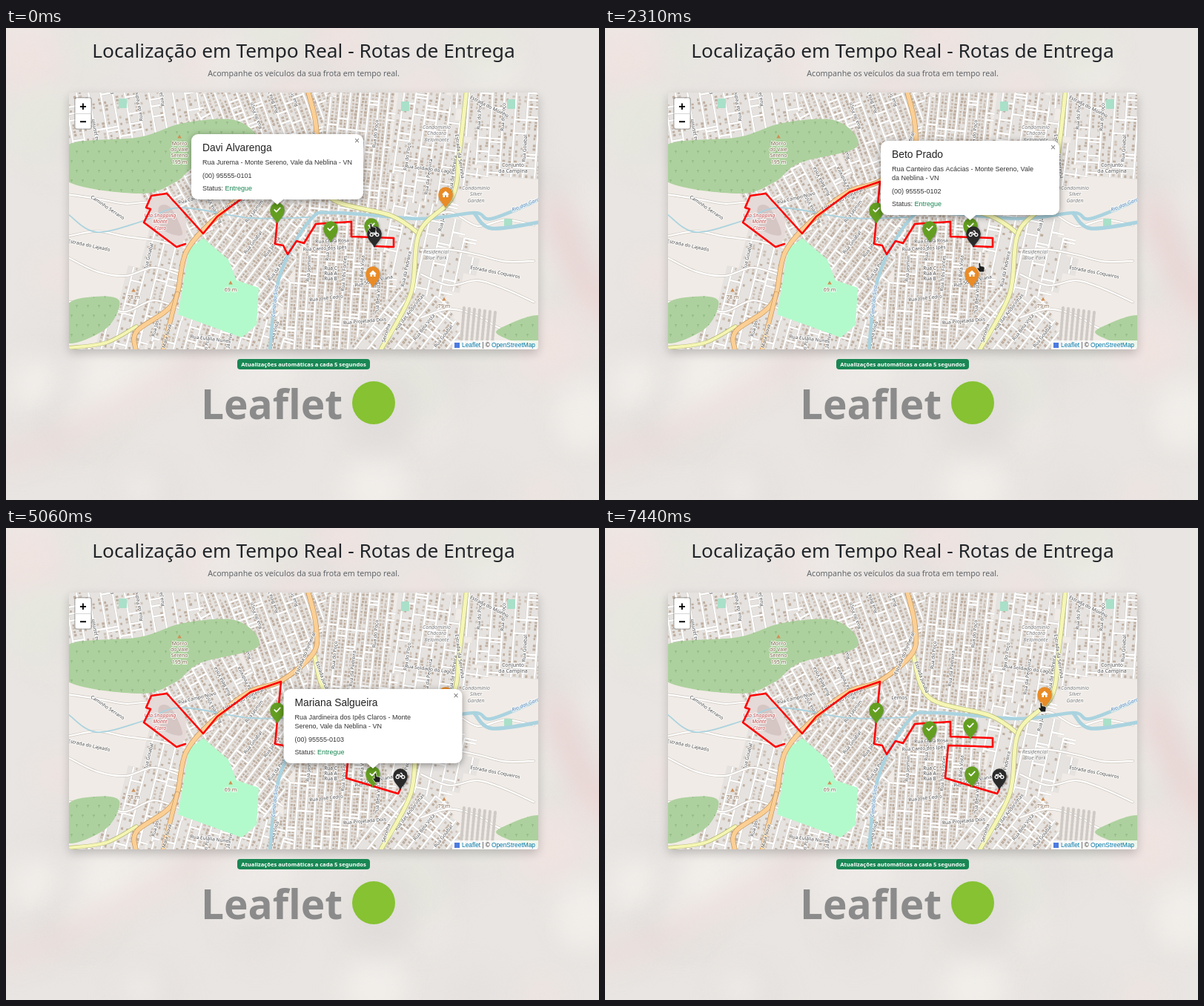
An HTML page with a canvas that plays this animation: 800x636 px, repeating every 7500 ms.

```html
<!DOCTYPE html>
<html lang="pt-BR">
<head>
<meta charset="utf-8">
<title>Rotas de Entrega</title>
<style>
  html, body { margin: 0; width: 100%; height: 100%; overflow: hidden; background: #e9e5e2; }
  canvas { display: block; }
</style>
</head>
<body>
<canvas id="stage" width="800" height="636"></canvas>
<script>
const LOOP = 7500;
const SANS = '"Noto Sans", sans-serif';
const ARIAL = '"Liberation Sans", Arial, sans-serif';
const MAP = { x: 85, y: 87, w: 633, h: 346 };
const stage = document.getElementById('stage').getContext('2d');
const scene = document.createElement('canvas');
scene.width = 800;
scene.height = 636;
const bg = scene.getContext('2d');

function random(seed) {
  return () => {
    seed = (seed * 1664525 + 1013904223) >>> 0;
    return seed / 4294967296;
  };
}

const clamp = (v, lo = 0, hi = 1) => Math.max(lo, Math.min(hi, v));

function text(c, str, x, y, font, color, align = 'left') {
  c.font = font;
  c.fillStyle = color;
  c.textAlign = align;
  c.fillText(str, x, y);
}

function box(c, x, y, w, h, r, color) {
  c.beginPath();
  c.roundRect(x, y, w, h, r);
  c.fillStyle = color;
  c.fill();
}

function disc(c, x, y, r, color) {
  c.beginPath();
  c.arc(x, y, r, 0, 7);
  c.fillStyle = color;
  c.fill();
}

function trace(c, p) {
  c.beginPath();
  for (let i = 0; i < p.length; i += 2) c.lineTo(p[i], p[i + 1]);
}

// Catmull-Rom spline through the points of a flat list.
function smooth(p, closed = false) {
  const n = p.length / 2;
  const at = i => {
    const k = closed ? (i + n) % n : clamp(i, 0, n - 1);
    return [p[2 * k], p[2 * k + 1]];
  };
  bg.beginPath();
  bg.moveTo(p[0], p[1]);
  for (let i = 0; i < (closed ? n : n - 1); i++) {
    const [a, b, c, d] = [at(i - 1), at(i), at(i + 1), at(i + 2)];
    bg.bezierCurveTo(b[0] + (c[0] - a[0]) / 6, b[1] + (c[1] - a[1]) / 6,
      c[0] - (d[0] - b[0]) / 6, c[1] - (d[1] - b[1]) / 6, c[0], c[1]);
  }
}

function road(p, width, color, casing) {
  smooth(p);
  bg.lineJoin = bg.lineCap = 'round';
  for (const [w, style] of [[width + 1.4, casing], [width, color]]) {
    if (!style) continue;
    bg.lineWidth = w;
    bg.strokeStyle = style;
    bg.stroke();
  }
}

function area(p, color) {
  smooth(p, true);
  bg.fillStyle = color;
  bg.fill();
}

function label(str, x, y, deg = 0, color = '#484848', font = '6.5px ') {
  bg.save();
  bg.translate(x, y);
  bg.rotate(deg * Math.PI / 180);
  bg.font = font + SANS;
  bg.textAlign = 'center';
  bg.lineJoin = 'round';
  bg.lineWidth = 2;
  bg.strokeStyle = 'rgba(255,255,255,.8)';
  bg.strokeText(str, 0, 2);
  bg.fillStyle = color;
  bg.fillText(str, 0, 2);
  bg.restore();
}

function place(str, x, y, color = '#787878', font = 'italic 7px ') {
  str.split('|').forEach((s, i) => label(s, x, y + i * 8.4, 0, color, font));
}

function peak(str, x, y) {
  trace(bg, [x - 2.8, y + 2.5, x, y - 2.5, x + 2.8, y + 2.5]);
  bg.fillStyle = '#d08f55';
  bg.fill();
  place(str, x, y + 9.5, '#7d6249', '7px ');
}

// Each spot of land belongs to the nearest centre; density 0 is open land.
const quarters = [
  { x: 145, y: 95, deg: -10, gap: 16, density: 0.35 },
  { x: 375, y: 140, deg: -20, gap: 14, density: 0.9 },
  { x: 470, y: 165, deg: 6, gap: 13, density: 0.95 },
  { x: 575, y: 165, deg: 8, gap: 16, density: 0.65 },
  { x: 670, y: 130, deg: 4, gap: 16, density: 0.6 },
  { x: 270, y: 225, deg: -28, gap: 14, density: 0.8 },
  { x: 325, y: 300, deg: 37, gap: 12, density: 0.9 },
  { x: 455, y: 345, deg: 4, gap: 12, density: 0.95 },
  { x: 215, y: 350, deg: 14, gap: 16, density: 0.5 },
  { x: 270, y: 430, deg: 15, gap: 14, density: 0.6 },
  { x: 580, y: 300, deg: 12, gap: 17, density: 0.25 },
  { x: 555, y: 415, deg: 38, gap: 14, density: 0.65 },
  { x: 660, y: 370, density: 0 },
  { x: 660, y: 265, density: 0 },
  { x: 125, y: 300, density: 0 }
];
const words = ['Jatobá', 'da Pedreira', 'Bela Vista', 'das Andorinhas', 'Jasmim', 'do Poço', 'Três Fontes', 'Goiabal'];

function owner(x, y) {
  const dist = q => Math.hypot(q.x - x, q.y - y);
  return quarters.reduce((a, b) => dist(b) < dist(a) ? b : a);
}

function drawQuarter(q, seed) {
  const rnd = random(seed);
  const a = q.deg * Math.PI / 180, size = q.gap * 12, step = 4.6;
  const inside = (u, v) =>
    owner(q.x + u * Math.cos(a) - v * Math.sin(a), q.y + u * Math.sin(a) + v * Math.cos(a)) === q;
  const streets = new Path2D();
  bg.save();
  bg.translate(q.x, q.y);
  bg.rotate(a);
  for (let u = -size; u <= size; u += q.gap) {
    for (let v = -size; v < size; v += step) {
      if (!inside(u, v)) continue;
      bg.fillStyle = '#e5e2df';
      bg.fillRect(u - q.gap / 2, v, q.gap + 0.5, step + 0.5);
      streets.moveTo(u, v);
      streets.lineTo(u, v + step);
      if (rnd() < 0.13) {
        streets.moveTo(u, v);
        streets.lineTo(u + q.gap, v);
      }
      for (const side of [-1, 1]) {
        if (rnd() > q.density) continue;
        bg.fillStyle = rnd() < 0.5 ? '#bfae9f' : '#cfc2b7';
        bg.fillRect(u + side * 4 - 1.7 + rnd(), v + rnd(), 2.4 + rnd() * 1.6, 2.4 + rnd() * 1.4);
      }
    }
  }
  for (const [width, color] of [[3.2, '#cbc6c1'], [2.4, '#fff']]) {
    bg.lineWidth = width;
    bg.strokeStyle = color;
    bg.stroke(streets);
  }
  for (let u = -size; u <= size; u += q.gap * 2) {
    const v = (rnd() - 0.5) * 110;
    const name = 'Rua ' + words[Math.floor(rnd() * words.length)];
    if (inside(u, v - 20) && inside(u, v + 20)) label(name, u, v, -90);
  }
  bg.restore();
}

function lanes() {
  const rnd = random(11);
  for (let i = 0; i < 8; i++) {
    const left = i % 2 ? 560 : 85, y = 230 + i * 22;
    const p = [];
    for (let k = 0; k < 5; k++) p.push(left + k * 38, y + (rnd() - 0.5) * 22 + k * 5);
    road(p, 2.2, '#fff', '#cfc8c1');
  }
}

function forest(p) {
  area(p, '#add19e');
  bg.save();
  bg.clip();
  bg.fillStyle = '#98bf8a';
  for (let y = 126; y < 433; y += 13) {
    for (let x = 88 + (y % 2) * 7; x < 718; x += 15) {
      bg.fillRect(x, y, 1, 4);
      bg.fillRect(x - 1, y, 3, 2);
    }
  }
  bg.restore();
}

function backdrop() {
  const rnd = random(27);
  const tints = ['#f1eeea', '#e1dddb', '#ede9e6', '#e6e7de', '#efe3e0', '#e5e1df'];
  bg.fillStyle = '#e9e5e2';
  bg.fillRect(0, 0, 800, 636);
  bg.save();
  bg.filter = 'blur(18px)';
  for (let i = 0; i < 90; i++) {
    disc(bg, rnd() * 800, rnd() * 636, 18 + rnd() * 34, tints[i % tints.length]);
  }
  road([-20, 585, 90, 545, 290, 430], 20, '#ecdcd9');
  road([740, 240, 775, 330, 830, 390], 26, '#e8cfce');
  bg.restore();
}

function drawLabels() {
  label('Caminho Serrano', 137, 242, 34);
  label('Estrada do Lajeado', 112, 293, 12);
  label('Rua Campo Novo', 258, 229, -14);
  label('Estrada do Pinheiral', 320, 231, -26);
  label('Estrada do Pinheiral', 404, 169, -67);
  label('Estrada Jurubá', 427, 201, 70);
  label('Estrada da Serrinha', 612, 173, 82);
  label('Estrada do Moinho', 652, 106, 27);
  label('Rua Soldado do Lago', 570, 190, 7);
  label('Estrada dos Coqueiros', 660, 329, 11);
  label('Rua Clara Rosa', 440, 287, -2);
  label('Rua Canto dos Ipês', 430, 297, -3);
  label('Rua José Cedro', 432, 364, -6);
  label('Rua Soares Viana', 496, 341, -13);
  label('Rua Projetada Dois', 484, 395, -5);
  label('Rua Eulália Nunes', 276, 419, 7);
  ['Rua C', 'Rua A', 'Rua B'].forEach((s, i) => label(s, 438, 324 + i * 7));
  label('Rio das Garças', 704, 237, -22, '#4d80b3', 'italic 7px ');
  label('Canal do Sítio', 363, 368, -84, '#4d80b3', 'italic 7px ');
  label('Mata Nova', 217, 415, -75);
  label('Serrinha', 513, 411, -72);
  place('Condomínio|Chácara|Belomonte', 581, 134);
  place('Condomínio|Silver|Garden', 634, 216);
  place('Residencial|Blue Park', 580, 302);
  place('Conjunto|da Campina', 684, 185, '#555', '7px ');
  place('Lemos', 397, 229, '#555', '7px ');
  place('Vila Shopping|Monte|Claro', 208, 253, '#c44a4a');
  peak('Morro|do Vale|Sereno|195 m', 234, 146);
  peak('69 m', 303, 343);
  peak('78 m', 172, 353);
  peak('79 m', 591, 365);
}

function drawLand() {
  quarters.forEach((q, i) => q.density && drawQuarter(q, i + 3));
  lanes();
  forest([82, 158, 180, 147, 240, 128, 312, 125, 340, 160, 262, 182, 228, 208, 180, 223, 82, 206]);
  forest([82, 374, 120, 362, 153, 368, 135, 405, 82, 424]);
  forest([721, 388, 672, 402, 665, 414, 721, 430]);
  trace(bg, [247, 298, 266, 283, 300, 312, 311, 340, 341, 350, 338, 400, 318, 417, 232, 386, 240, 340]);
  bg.fillStyle = '#b2facb';
  bg.fill();
  for (const [x, y] of [[152, 95], [676, 96], [533, 99], [672, 257]]) box(bg, x, y, 11, 13, 1, '#a9e0c9');

  area([196, 230, 217, 227, 243, 262, 232, 293, 190, 264], '#e6dad8');
  area([206, 242, 222, 242, 238, 278, 211, 271], '#d5c6c4');

  // Terraced plots
  bg.strokeStyle = '#cfcac5';
  bg.lineWidth = 4;
  bg.setLineDash([3, 2]);
  for (let i = 0; i < 7; i++) {
    trace(bg, [618 + i * 7, 377 + i, 614 + i * 7, 424]);
    bg.stroke();
  }
  bg.setLineDash([]);
}

function drawRoads() {
  const water = '#aad3df', yellow = '#f5f6b4', olive = '#b8bc78';
  const orange = '#fbcf94', edge = '#c8955a';
  road([718, 232, 655, 257, 632, 249, 560, 257, 445, 249, 410, 259, 369, 335, 356, 433], 4.5, water);
  road([632, 250, 655, 270, 718, 262], 5, water);
  road([85, 252, 122, 275, 185, 260, 235, 242, 330, 256, 408, 255], 1.8, water);
  road([85, 431, 135, 424, 176, 402], 4, yellow, olive);
  road([416, 172, 438, 229, 520, 253, 558, 278], 5, yellow, olive);
  road([621, 87, 612, 165, 602, 228, 558, 275, 546, 358, 506, 433], 5, yellow, olive);
  road([175, 433, 177, 408, 226, 370, 243, 302, 285, 254, 330, 220, 371, 206, 415, 168, 418, 130, 408, 87], 5.5, orange, edge);
  road([212, 433, 231, 358], 5, orange, edge);
}

function drawControls() {
  box(bg, 92, 93, 24, 44, 4, 'rgba(0,0,0,.22)');
  box(bg, 93.5, 94.5, 21, 41, 2.5, '#fff');
  bg.fillStyle = '#ccc';
  bg.fillRect(93.5, 115, 21, 0.8);
  text(bg, '+', 104, 110.5, 'bold 16px ' + ARIAL, '#000', 'center');
  bg.fillRect(100, 125.3, 8, 1.9);

  const small = '8.4px ' + ARIAL;
  box(bg, 602, 421, 116, 12, 0, 'rgba(255,255,255,.8)');
  text(bg, 'OpenStreetMap', 714, 430, small, '#0078a8', 'right');
  text(bg, '| ©', 653, 430, small, '#333', 'right');
  text(bg, 'Leaflet', 615, 430, small, '#0078a8');
  box(bg, 605, 424, 7, 7, 0, '#4c7be1');
}

function drawScene() {
  const { x, y, w, h } = MAP;
  backdrop();
  text(bg, 'Localização em Tempo Real - Rotas de Entrega', 401.5, 40, '26.3px ' + SANS, '#212529', 'center');
  text(bg, 'Acompanhe os veículos da sua frota em tempo real.', 401.5, 65, '10.65px ' + SANS, '#5f6468', 'center');
  bg.save();
  bg.shadowColor = 'rgba(0,0,0,.2)';
  bg.shadowBlur = 13;
  bg.shadowOffsetY = 5;
  box(bg, x, y, w, h, 4, '#f0ebe6');
  bg.restore();
  bg.save();
  bg.beginPath();
  bg.roundRect(x, y, w, h, 4);
  bg.clip();
  drawLand();
  drawRoads();
  drawLabels();
  drawControls();
  bg.restore();

  box(bg, 312, 446, 179, 14, 4, '#198754');
  text(bg, 'Atualizações automáticas a cada 5 segundos', 401.5, 456, 'bold 7.6px ' + SANS, '#fff', 'center');
  text(bg, 'Leaflet', 263, 527, 'bold 55px ' + SANS, '#8b8b8b');
  disc(bg, 496, 505, 29, '#86c232');
}

const route = [242, 291, 230, 295, 186, 262, 195, 244, 189, 242, 196, 226, 217, 223, 266, 277, 285, 254,
  330, 221, 371, 207, 363, 291, 374, 293, 380, 305, 392, 287, 402, 290, 418, 264, 466, 261,
  466, 281, 523, 283, 523, 295, 497, 294];
const extension = [463, 293, 459, 337, 529, 358, 532, 352];

const icons = {
  check(c) {
    trace(c, [-3.8, 0, -1.2, 2.6, 3.8, -2.6]);
    c.lineWidth = 1.7;
    c.stroke();
  },
  home(c) {
    trace(c, [-5, 0.3, 0, -4.5, 5, 0.3]);
    c.fill();
    c.fillRect(-3.5, 0, 2.5, 4);
    c.fillRect(1, 0, 2.5, 4);
    c.fillRect(-3.5, 0, 7, 1.3);
  },
  moto(c) {
    c.lineWidth = 1.3;
    for (const x of [-3.8, 3.8]) {
      c.beginPath();
      c.arc(x, 1.6, 2.1, 0, 7);
      c.stroke();
    }
    trace(c, [-4.5, -1.6, -1, -1.6, 0.4, 1.4, 2.6, -1.4, 1.6, -3.6, 0.2, -3.6]);
    c.stroke();
  }
};

const pins = { check: '#639e20', home: '#e98b26', moto: '#2a2a2a' };

function marker(x, y, icon) {
  const c = stage, r = 9.7;
  c.save();
  c.translate(x, y);
  c.shadowColor = 'rgba(0,0,0,.35)';
  c.shadowBlur = 3;
  c.shadowOffsetX = c.shadowOffsetY = 1;
  c.beginPath();
  c.moveTo(0, 18);
  c.bezierCurveTo(-2, 12, -r, 8, -r, 0);
  c.arc(0, -1, r, Math.PI, 0);
  c.bezierCurveTo(r, 8, 2, 12, 0, 18);
  c.fillStyle = pins[icon];
  c.fill();
  c.shadowColor = 'transparent';
  c.fillStyle = c.strokeStyle = '#fff';
  c.translate(0, -1);
  icons[icon](c);
  c.restore();
}

const popups = [
  { x: 366, y: 246, w: 232, start: -200, end: 300, name: 'Davi Alvarenga',
    street: ['Rua Jurema - Monte Sereno, Vale da Neblina - VN'], phone: '(00) 95555-0101' },
  { x: 492.5, y: 267, w: 241, start: 300, end: 3565, name: 'Beto Prado',
    street: ['Rua Canteiro das Acácias - Monte Sereno, Vale', 'da Neblina - VN'], phone: '(00) 95555-0102' },
  { x: 495, y: 332, w: 241, start: 3565, end: 5775, name: 'Mariana Salgueira',
    street: ['Rua Jardineira dos Ipês Claros - Monte', 'Sereno, Vale da Neblina - VN'], phone: '(00) 95555-0103' }
];

// The bubble stands on its marker and grows by one line height per street line.
function popup(p, t) {
  const alpha = clamp((t - p.start) / 200) * (1 - clamp((t - p.end) / 200));
  if (!alpha) return;
  const c = stage, h = 76 + 12 * p.street.length;
  const bottom = p.y - 15, y = bottom - h, x = p.x - p.w / 2, left = x + 15;
  const body = '9px ' + ARIAL;
  c.save();
  c.globalAlpha = alpha;
  c.beginPath();
  c.roundRect(x, y, p.w, h, 9);
  c.moveTo(p.x - 8, bottom);
  c.lineTo(p.x, bottom + 7);
  c.lineTo(p.x + 8, bottom);
  c.shadowColor = 'rgba(0,0,0,.4)';
  c.shadowBlur = 10;
  c.shadowOffsetY = 2;
  c.fillStyle = '#fff';
  c.fill();
  c.shadowColor = 'transparent';
  text(c, p.name, left, y + 22.5, '13.8px ' + ARIAL, '#222');
  p.street.forEach((s, i) => text(c, s, left, y + 41 + i * 12, body, '#333'));
  text(c, p.phone, left, bottom - 29.5, body, '#333');
  text(c, 'Status: ', left, bottom - 12, body, '#333');
  text(c, 'Entregue', left + c.measureText('Status: ').width, bottom - 12, body, '#198754');
  text(c, '×', x + p.w - 8.5, y + 13, '12px ' + ARIAL, '#757575', 'center');
  c.restore();
}

const moves = [
  [0, 494, 270], [1400, 494, 268], [2310, 507, 323], [3000, 500, 337],
  [6350, 500, 337], [7440, 590, 242], [LOOP, 590, 242]
];

function cursorAt(t) {
  const i = moves.findIndex(m => m[0] > t);
  const [t0, x0, y0] = moves[i - 1], [t1, x1, y1] = moves[i];
  const u = (t - t0) / (t1 - t0), e = u * u * (3 - 2 * u);
  return [x0 + (x1 - x0) * e, y0 + (y1 - y0) * e];
}

function hand([x, y]) {
  const c = stage;
  c.save();
  c.translate(x, y);
  c.lineJoin = 'round';
  trace(c, [-2.6, -6, -1, -6.6, -0.4, -2, 3.8, -1.2, 4.8, 0, 4.2, 5.6, -1.6, 5.6, -4.8, 1, -4, 0, -2.4, 1]);
  c.closePath();
  c.strokeStyle = 'rgba(255,255,255,.75)';
  c.lineWidth = 1.6;
  c.stroke();
  c.fillStyle = '#1c1c1c';
  c.fill();
  c.restore();
}

function draw(t) {
  const updated = t >= 4400;
  stage.drawImage(scene, 0, 0);
  trace(stage, updated ? route.concat(extension) : route);
  stage.strokeStyle = '#f00';
  stage.lineWidth = 2.6;
  stage.lineJoin = stage.lineCap = 'round';
  stage.stroke();

  marker(593, 225, 'home');
  marker(366, 246, 'check');
  marker(493, 267, 'check');
  marker(438, 271, 'check');
  marker(495, 332, updated ? 'check' : 'home');
  if (updated) marker(532, 335, 'moto');
  else marker(497, 278, 'moto');

  for (const p of popups) popup(p, t);
  hand(cursorAt(t));
}

drawScene();
const begin = performance.now();
function tick() {
  draw((performance.now() - begin) % LOOP);
  requestAnimationFrame(tick);
}
tick();
</script>
</body>
</html>
```
